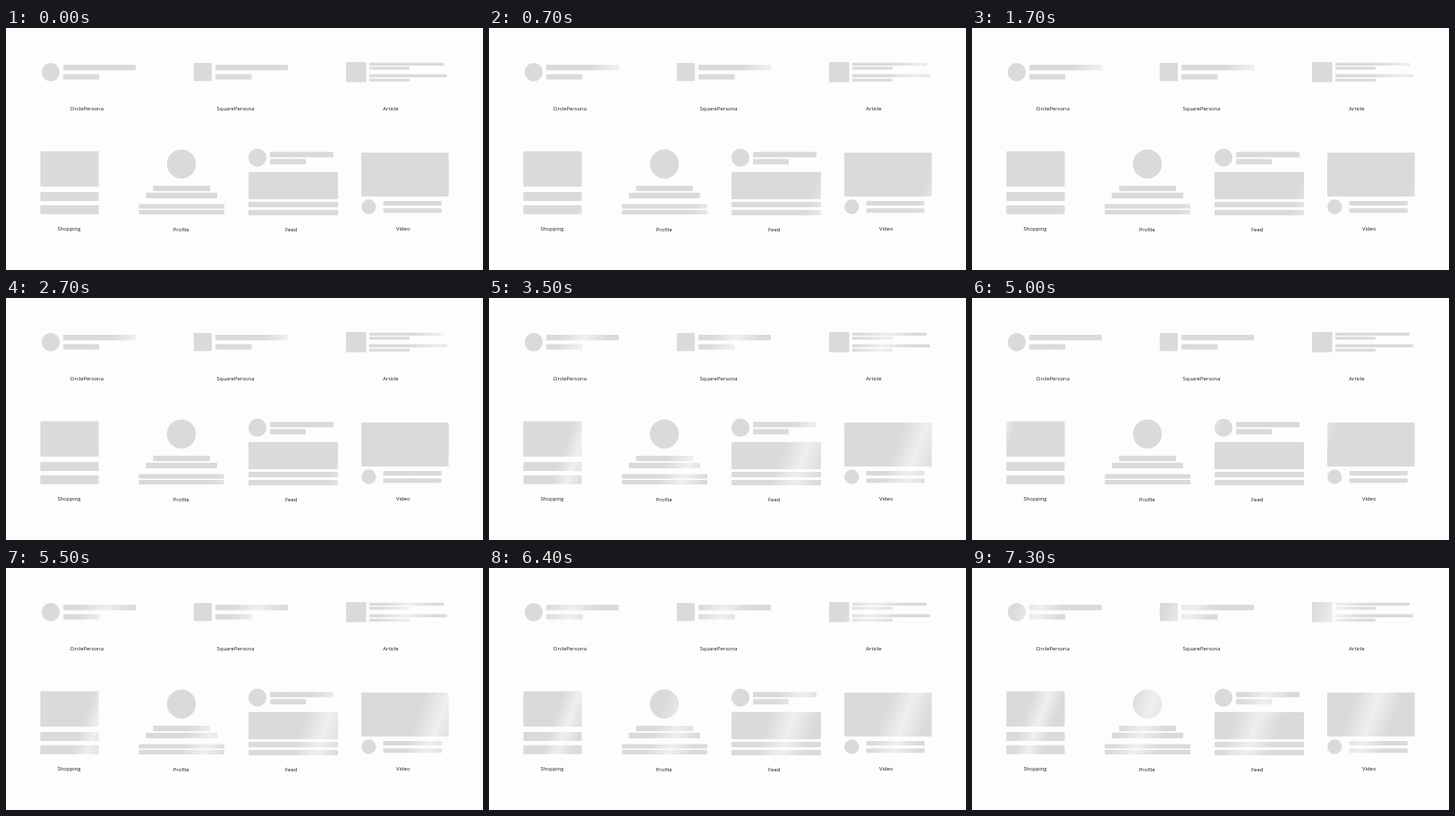
Animation, 533 px wide and 270 px high, one loop 7.4 s. Source, as an HTML page with a canvas:

```html
<!DOCTYPE html>
<html lang="en">
<head>
<meta charset="utf-8">
<title>Shimmer placeholders</title>
<style>
  html, body { margin: 0; width: 100%; height: 100%; overflow: hidden; background: #fdfdfe; }
  canvas { display: block; }
</style>
</head>
<body>
<canvas id="stage"></canvas>
<script>
const W = 533, H = 270;
const LOOP = 7400, STEP = 100, SWEEP = 988;
const TILT = 20 * Math.PI / 180;
const BASE = '#dadadb', LIGHT = '#efeff0', INK = '#1c1c1c';

const canvas = document.getElementById('stage');
const ctx = canvas.getContext('2d');
const ratio = window.devicePixelRatio || 1;
canvas.width = W * ratio;
canvas.height = H * ratio;
canvas.style.width = W + 'px';
canvas.style.height = H + 'px';

const bar = (x1, y1, x2, y2) => ({ x1, y1, x2, y2, round: 0.9 });
const disc = (x, y, r) => ({ x1: x - r, y1: y - r, x2: x + r, y2: y + r, round: r });

// phase: position of the sweep at time zero, as a share of one pass
function card(label, labelX, labelY, phase, parts) {
  const left = Math.min(...parts.map(p => p.x1)), right = Math.max(...parts.map(p => p.x2));
  const top = Math.min(...parts.map(p => p.y1)), bottom = Math.max(...parts.map(p => p.y2));
  const path = new Path2D();
  for (const p of parts) path.roundRect(p.x1, p.y1, p.x2 - p.x1, p.y2 - p.y1, p.round);
  const width = right - left;
  return {
    label, labelX, labelY, phase, path, width,
    midX: (left + right) / 2,
    midY: (top + bottom) / 2,
    travel: 1.8 * (width + Math.tan(TILT) * (bottom - top))
  };
}

const cards = [
  card('CirclePersona', 90.2, 92, 0.016, [
    disc(50, 49.2, 10.2), bar(64, 41, 145, 47.2), bar(64, 51.4, 104.4, 57.6)
  ]),
  card('SquarePersona', 256.5, 92, 0.016, [
    bar(209.8, 39, 230, 59.2), bar(234, 41, 315, 47.2), bar(234, 51.4, 274.5, 57.6)
  ]),
  card('Article', 430, 92, -0.018, [
    bar(380, 38, 402.6, 60.6),
    bar(405.8, 38.7, 489.2, 42), bar(405.8, 43.2, 451, 46.6),
    bar(405.8, 51.6, 492.8, 55), bar(405.8, 56.4, 451, 59.7)
  ]),
  card('Shopping', 70.5, 226, 0.13, [
    bar(38.4, 137.5, 103.6, 177), bar(38.4, 183, 103.6, 193), bar(38.4, 197.7, 103.6, 207.7)
  ]),
  card('Profile', 195.6, 227, 0.1, [
    disc(196, 151.8, 16.2),
    bar(164.3, 176, 228, 182), bar(156.2, 183.7, 236, 190),
    bar(148.4, 196.4, 244, 201.4), bar(148.4, 203, 244, 208)
  ]),
  card('Feed', 318.7, 227, 0.1, [
    disc(281, 144.7, 10.1),
    bar(295, 138.2, 366, 144.2), bar(295, 146.2, 335, 152.2),
    bar(271, 160.8, 371, 191), bar(271, 194, 371, 200), bar(271, 203, 371, 209)
  ]),
  card('Video', 443.7, 226, 0.1, [
    bar(397, 139, 494.7, 188), disc(405.3, 199.5, 8.2),
    bar(421.5, 193, 486.8, 198), bar(421.5, 201.2, 486.8, 206.2)
  ])
];

function sheen(c, time) {
  const turn = time / SWEEP + c.phase;
  const share = turn - Math.floor(turn);
  const x = c.midX + (share - 0.5) * c.travel;
  const dx = Math.cos(TILT) * c.width / 4, dy = Math.sin(TILT) * c.width / 4;
  const fill = ctx.createLinearGradient(x - dx, c.midY - dy, x + dx, c.midY + dy);
  fill.addColorStop(0, BASE);
  fill.addColorStop(0.5, LIGHT);
  fill.addColorStop(1, BASE);
  return fill;
}

function draw(time) {
  ctx.setTransform(ratio, 0, 0, ratio, 0, 0);
  ctx.fillStyle = '#fdfdfe';
  ctx.fillRect(0, 0, W, H);
  ctx.font = '5.9px "Open Sans", "Noto Sans", sans-serif';
  ctx.textAlign = 'center';
  for (const c of cards) {
    ctx.fillStyle = sheen(c, time);
    ctx.fill(c.path);
    ctx.fillStyle = INK;
    ctx.fillText(c.label, c.labelX, c.labelY);
  }
}

const start = performance.now();
function tick() {
  const time = (performance.now() - start) % LOOP;
  draw(Math.floor(time / STEP) * STEP);
  requestAnimationFrame(tick);
}
tick();
</script>
</body>
</html>
```
